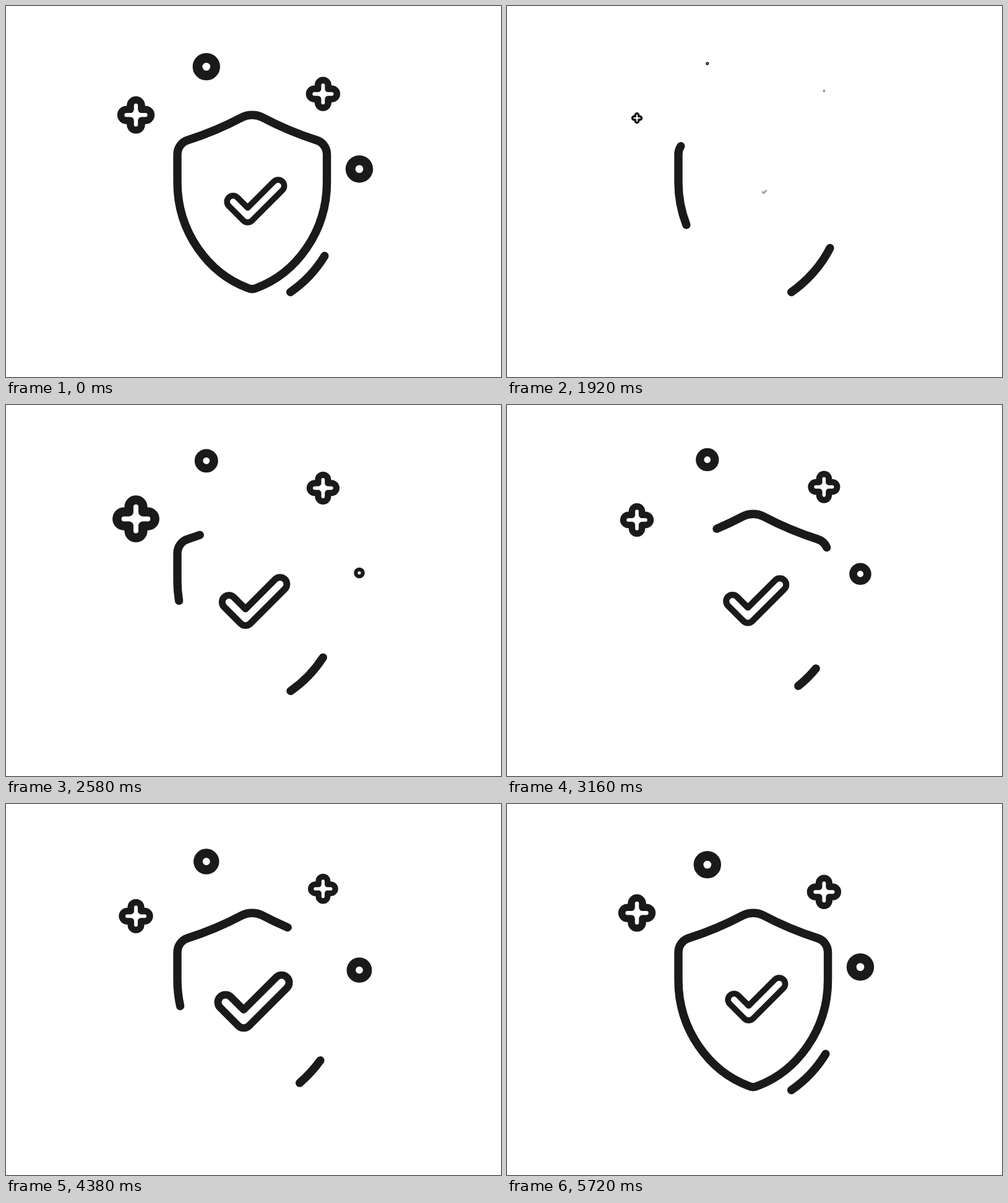
Animation of 800 by 600 pixels, one loop 7.2 s. Source, as an HTML page with a canvas:

```html
<!DOCTYPE html>
<html lang="en">
<head>
<meta charset="utf-8">
<title>Shield</title>
<style>
  html, body { margin: 0; width: 100%; height: 100%; overflow: hidden; background: #fff; }
  canvas { display: block; }
</style>
</head>
<body>
<canvas id="stage" width="800" height="600"></canvas>
<script>
const ctx = document.getElementById('stage').getContext('2d');
const LOOP = 7200, STEP = 20, BLANK_FROM = 20, DRAW_FROM = 460, END = 5720;
const INK = '#1a1a1a';
const PI = Math.PI;

const clamp = p => Math.min(Math.max(p, 0), 1);
const ramp = (t, from, to) => clamp((t - from) / (to - from));
const mix = (a, b, p) => a + (b - a) * p;
const ease = (t, from, to) => {
  const p = ramp(t, from, to);
  return p * p * (3 - 2 * p);
};

// Each end of a trimmed line is a sum of eased moves along its path.
const shield = {
  ...measure(
    'M518.6 285 C518.6 366 468 432.5 405 456 C400 458.4 395.6 458.4 390.6 456' +
    'C327.6 432.5 277 366 277 285 L277 240 C277 229 284 220 293.5 217' +
    'C325 207 355 194 381.5 180 C391.5 175 404 175 414 180' +
    'C440.6 194 470.6 207 502 217 C511.6 220 518.6 229 518.6 240 Z'),
  tail: t => 400 * ease(t, 750, 2100) + 187 * ease(t, 2400, 3300) - 587 * ease(t, 3850, 5300),
  head: t => 519 * ramp(t, DRAW_FROM, 1950) ** 0.86 + 270 * ease(t, 2400, 3300)
    - 88 * ease(t, 3300, 4380) + 127 * ease(t, 4380, 5300)
};
const accent = {
  ...measure('M459.6 462.7 C483.6 446.2 507.5 420.5 522 391.5'),
  tail: t => 31 * (ease(t, 2470, 3950) - ease(t, 3850, 5100)),
  head: t => 97 * ease(t, DRAW_FROM, 1920) - 45 * ease(t, 1880, 3350) + 29 * ease(t, 3400, 5200)
};

// Every part pops in from its start, then bounces through its three levels and settles at 1.
const parts = [
  { draw: plus, x: 210, y: 176.3, size: 1, drift: 1, start: 1803, levels: [1.4, 0.9, 0.917] },
  { draw: plus, x: 512.4, y: 142.2, size: 0.918, drift: -1, start: 1882, levels: [0.966, 0.94, 0.88] },
  { draw: ring, x: 323.8, y: 98.1, size: 1, drift: -1, start: 1848, levels: [0.86, 0.84, 0.935] },
  { draw: ring, x: 571, y: 263.6, size: 1, drift: 1, start: 2350, levels: [0.93, 0.8, 0.92] },
  { draw: check, x: 417, y: 299.4, size: 1, drift: 0, start: 1882, levels: [1.155, 1.05, 1.245] }
];

function measure(d) {
  const el = document.createElementNS('http://www.w3.org/2000/svg', 'path');
  el.setAttribute('d', d);
  return { path: new Path2D(d), length: el.getTotalLength() };
}

function bounce(t, start, levels) {
  const beats = [start, start + 540, 3160, 4380, 5200];
  return [...levels, 1].reduce(
    (v, level, i) => mix(v, level, ramp(t, beats[i], beats[i + 1])), 0);
}

const drift = t => 10 * Math.min(ramp(t, 800, 3060), 1 - ramp(t, 3060, END));

function drawTrim(line, t) {
  const tail = line.tail(t);
  const span = Math.max(Math.min(line.head(t), line.length) - tail, 0.01);
  ctx.lineWidth = 13.4;
  ctx.setLineDash(span > line.length - 0.5 ? [] : [span, line.length * 2]);
  ctx.lineDashOffset = -tail;
  ctx.stroke(line.path);
  ctx.setLineDash([]);
}

function plus() {
  for (let i = 0; i < 4; i++) {
    ctx.lineTo(-9, -9);
    ctx.arc(0, -15.4, 9, PI, 2 * PI);
    ctx.rotate(PI / 2);
  }
  ctx.closePath();
  ctx.lineWidth = 11.6;
}

function ring() {
  ctx.arc(0, 0, 14.3, 0, 2 * PI);
  ctx.lineWidth = 15.8;
}

function check() {
  const r = 9.8;
  ctx.arc(-50, 17.1, r, PI * 0.75, PI * 1.75);
  ctx.lineTo(-26.4, 40.7 - r * Math.SQRT2);
  ctx.arc(22.8, -8.5, r, PI * 1.25, PI * 2.25);
  ctx.arc(-26.4, 40.7, r, PI * 0.25, PI * 0.75);
  ctx.closePath();
  ctx.lineWidth = 9.6;
}

function drawPart(part, t) {
  const s = bounce(t, part.start, part.levels) * part.size;
  if (s <= 0) return;
  ctx.save();
  ctx.translate(part.x, part.y + part.drift * drift(t));
  ctx.scale(s, s);
  ctx.beginPath();
  part.draw();
  ctx.stroke();
  ctx.restore();
}

function render(t) {
  ctx.fillStyle = '#fff';
  ctx.fillRect(0, 0, 800, 600);
  if (t < BLANK_FROM) t = END;
  if (t < DRAW_FROM) return;
  ctx.strokeStyle = INK;
  ctx.lineCap = ctx.lineJoin = 'round';
  drawTrim(shield, t);
  drawTrim(accent, t);
  parts.forEach(part => drawPart(part, t));
}

function tick() {
  const t = performance.now() % LOOP;
  render(Math.floor(t / STEP) * STEP);
  requestAnimationFrame(tick);
}
tick();
</script>
</body>
</html>
```
